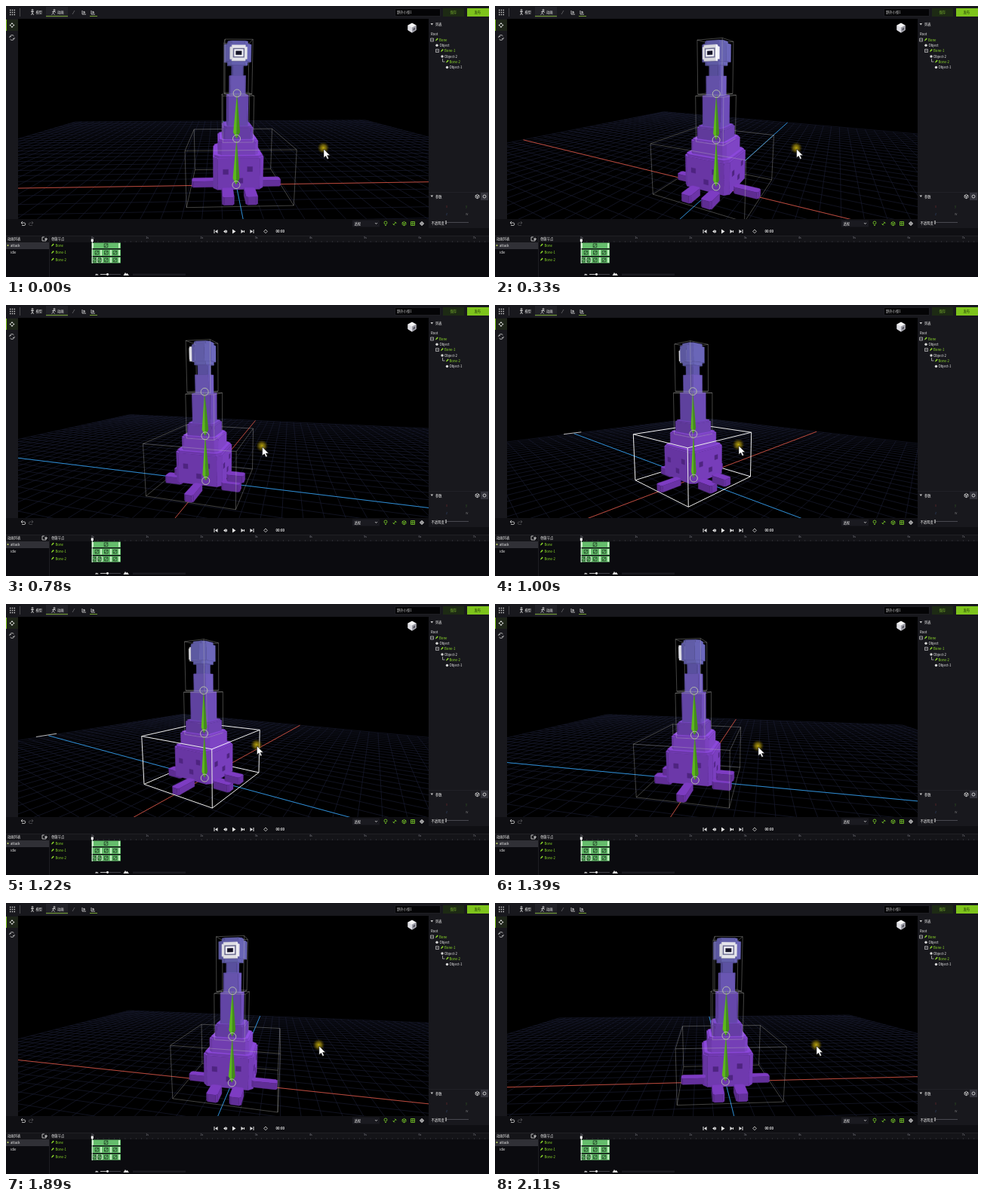
An HTML page with a canvas for the animation above (2160 ms loop, 640 by 360 pixels).

```html
<!DOCTYPE html>
<html lang="zh">
<head>
<meta charset="utf-8">
<title>Voxel animation editor</title>
<style>
  html, body { margin: 0; width: 100%; height: 100%; overflow: hidden; background: #000; }
  canvas { position: absolute; left: 16px; top: 17px; }
  svg { position: absolute; left: 0; top: 0; display: block; }
  text { font: 500 4.3px "Noto Sans CJK SC", "Noto Sans CJK", "Noto Sans", sans-serif; fill: #f0f0f0; }
  .bone { fill: #8fe02a; }
  .line { fill: none; stroke: #dedede; stroke-width: .8; }
  .green { stroke: #7bd02a; }
  .dim { opacity: .4; }
</style>
</head>
<body>
<canvas id="view" width="544" height="266"></canvas>
<svg width="640" height="360" viewBox="0 0 640 360">
  <defs>
    <radialGradient id="glow">
      <stop offset="0" stop-color="#d8c010" stop-opacity=".85"/>
      <stop offset=".5" stop-color="#a08a08" stop-opacity=".6"/>
      <stop offset="1" stop-color="#605000" stop-opacity="0"/>
    </radialGradient>
    <path id="key" d="M-2.3-2.3h4.6v4.6h-4.6zM-2.3 2.3L2.3-2.3" fill="none" stroke="#1c3a20" stroke-width=".8"/>
    <path id="pin" d="M0 3L.6 1.3 2.6-.9 3.7.2 1.6 2.3z" fill="#8fdc2c"/>
    <path id="cube" d="M0-2.6L2.4-1.3V1.4L0 2.7-2.4 1.4V-1.3zM-2.4-1.3L0 0 2.4-1.3M0 0V2.7"/>
  </defs>

  <!-- panels -->
  <g fill="#18181d">
    <path d="M0 0H640V17H0zM0 17H16V283H0zM560 17H640V295H560z"/>
    <path d="M0 283H560V295H0zM0 295H640V305H0z" fill="#0f0f13"/>
    <path d="M0 305H640V360H0z" fill="#0b0b0f"/>
    <path d="M0 305H640V314H0z" fill="#141418"/>
  </g>
  <path d="M560 247.500H640M57.500 305V360M0 305.500H640" stroke="#26262c" stroke-width=".7"/>

  <!-- top bar -->
  <path d="M5 5.500h7M5 8.500h7M5 11.500h7" stroke="#ccc" stroke-width="1.400" stroke-dasharray="1.400 1.400"/>
  <path class="line" d="M18.500 3V14" opacity=".3"/>
  <g class="line"><circle cx="35" cy="5.500" r="1"/><path d="M33 7.500h4M35 7v2l-1.500 3M35 9l1.500 3"/></g>
  <text x="39.500" y="10">模型</text>
  <path d="M53 1H82V16H53z" fill="#222228"/>
  <g class="line"><circle cx="64" cy="5.500" r="1"/><path d="M61 8l3-1 2 1.500M63.500 7l-1 2.500-2 2M62.500 9.500l2 2"/></g>
  <text x="68" y="10">动画</text>
  <path d="M53 13.500H82M111 13.500h10" stroke="#8ec43c" stroke-width=".8"/>
  <g class="line"><path d="M88 11l3-5" opacity=".4"/><path d="M101 6v5h5M103 9.500V7l2 1.500zM113 6v5h5M115 9.500V7l2 1.500z"/></g>
  <path d="M515.500 3.500H575.500V13.500H515.500z" fill="#040406" stroke="#292930" stroke-width=".6"/>
  <text x="518" y="10" style="fill:#c8c8c8">野外小怪1</text>
  <path d="M579 3H607V14H579z" fill="#1d2a14"/>
  <text x="588.500" y="10" style="fill:#7cb82e">保存</text>
  <path d="M611 3H640V14H611z" fill="#7ec41c"/>
  <text x="620.500" y="10" style="fill:#22380a">发布</text>

  <!-- tools -->
  <path d="M0 18H16V33H0z" fill="#1e2519"/>
  <path d="M0 18h1v15H0z" fill="#7ec41c"/>
  <path d="M8 22l1.600 2H6.400zM8 29l1.600-2H6.400zM4.500 25.500l2-1.600v3.200zM11.500 25.500l-2-1.600v3.200z" fill="#e8e8e8"/>
  <g class="line"><path d="M5.500 40a3 3 0 0 1 5 0M10.500 44a3 3 0 0 1-5 0M4.500 42l1-2 1.500 1M11.500 42l-1 2-1.500-1"/></g>
  <path d="M538 22.500L543.500 25.500V32L538 35.500 532.500 32V25.500z" fill="#f4f4f4"/>
  <path d="M538 28.500L543.500 25.500V32L538 35.500z" fill="#a0a0aa"/>
  <path d="M538 28.500V35.500L532.500 32V25.500z" fill="#dcdce2"/>
  <path d="M539.500 30l2.500-1.400v2.600l-2.500 1.500z" fill="#55555e"/>

  <!-- outline tree -->
  <path d="M562.500 23h3.600l-1.800 2.400zM562.500 251.500h3.600l-1.800 2.400z" fill="#ccc"/>
  <text x="569" y="26">列表</text>
  <text x="563" y="39">Root</text>
  <g class="line" stroke-width=".5" opacity=".8"><path d="M562.500 43h4v4h-4zM563.500 45h2M569.500 57.500h4v4h-4zM570.500 59.500h2M578.500 70v4h3"/></g>
  <use href="#pin" x="569" y="43.500"/><text class="bone" x="574" y="46.500">Bone</text>
  <use href="#pin" x="576" y="58"/><text class="bone" x="581" y="61.200">Bone-1</text>
  <use href="#pin" x="583" y="72.500"/><text class="bone" x="587.500" y="76">Bone-2</text>
  <g fill="#d8d8d8"><circle cx="571" cy="52.200" r="1.700"/><circle cx="578" cy="67" r="1.700"/><circle cx="584.500" cy="81.500" r="1.700"/></g>
  <text x="574.500" y="53.800">Object</text>
  <text x="581" y="68.500">Object-2</text>
  <text x="587.500" y="83">Object-1</text>

  <!-- parameters -->
  <text x="569" y="254.500">参数</text>
  <path d="M629 248H639V258H629z" fill="#34343c"/>
  <use href="#cube" class="line" x="624.500" y="253"/>
  <g class="line"><circle cx="634" cy="253" r="2"/></g>
  <g class="dim"><text x="583" y="268" style="fill:#d04040">x</text><text x="609" y="268" style="fill:#50b030">y</text><text x="583" y="278" style="fill:#5080d0">z</text><text x="609" y="278">w</text></g>
  <text x="563.500" y="289.500">不透明度</text>
  <path d="M583 287.500H613" stroke="#55555e" stroke-width=".8"/><path d="M583 285v5" stroke="#eee"/>

  <!-- viewport footer -->
  <g class="line"><path d="M20 288h4a1.700 1.700 0 0 1 0 3.500h-3M22 286l-2 2 2 2"/><path d="M36 288h-4a1.700 1.700 0 0 0 0 3.500h3M34 286l2 2-2 2" opacity=".3"/></g>
  <path d="M459 284.500H495V293.500H459z" fill="#1a1a20"/>
  <text x="461.500" y="290.500">透视</text><path class="line" d="M489 288l1.500 1.500 1.500-1.500"/>
  <g class="line green"><circle cx="503" cy="288" r="2"/><path d="M502 291.500h2M513 291l4-4M512.500 289l2.500 2.500M515 286.500l2.500 2.500M536.500 286.500h5v5h-5zM539 286.500v5M536.500 289h5"/></g>
  <use href="#cube" class="line green" x="527.500" y="289"/>
  <g class="line"><circle cx="551" cy="289" r="2"/><path d="M551 286v6M548 289h6"/></g>

  <!-- playback -->
  <g fill="#e4e4e4"><path d="M275.500 297h1v5h-1zM280.500 297v5l-3.500-2.500zM291.500 297v5l-3.500-2.500zM300 296.500l4.500 3-4.500 3zM311.500 297v5l3.500-2.500zM323.500 297v5l3.500-2.500zM327.500 297h1v5h-1z"/><path d="M292 298h1v3h-1zM315 298h1v3h-1z"/></g>
  <path class="line" d="M344 297l2.400 2.400-2.400 2.400-2.400-2.400z" stroke-width="1.100"/>
  <text x="357.500" y="301" style="font-weight:700">00:00</text>

  <!-- timeline -->
  <text x="2" y="311">动画列表</text>
  <g class="line"><path d="M51 307h-3v5h5v-3M51 309.500h4M53 307.500v4"/></g>
  <text x="60" y="311">骨骼节点</text>
  <path d="M0 314H57V323H0z" fill="#303036"/>
  <circle cx="2.500" cy="318" r="1" fill="#c2d860"/>
  <text x="6" y="319.700">attack</text>
  <text x="6" y="329">idle</text>
  <use href="#pin" x="60" y="316.500"/><text class="bone" x="65.500" y="319.700">Bone</text>
  <use href="#pin" x="60" y="326"/><text class="bone" x="65.500" y="329.300">Bone-1</text>
  <use href="#pin" x="60" y="335.500"/><text class="bone" x="65.500" y="338.800">Bone-2</text>
  <path d="M114.300 313H640" stroke="#3a3a42" stroke-width="2" stroke-dasharray=".6 6.625"/>
  <g id="ruler"></g>
  <path d="M113.500 314.500H152V322H113.500zM113.500 323.500H152V332H113.500zM113.500 333.500H152V341.500H113.500z" fill="#65bd6c"/>
  <path d="M114 315h2v6.500h-2zM149 315h2v6.500h-2zM125 324h2v7.500h-2zM138 324h2v7.500h-2zM149 324h2v7.500h-2zM120 334h2v7h-2zM126 334h2v7h-2zM138 334h2v7h-2zM149 334h2v7h-2z" fill="#c5f2c2"/>
  <use href="#key" x="132.500" y="318.200"/>
  <use href="#key" x="120.500" y="327.700"/><use href="#key" x="132.800" y="327.700"/><use href="#key" x="144.500" y="327.700"/>
  <use href="#key" x="117" y="337.500"/><use href="#key" x="124" y="337.500"/><use href="#key" x="132.800" y="337.500"/><use href="#key" x="144.500" y="337.500"/>
  <path d="M114.300 311V342" stroke="#fff" stroke-width=".8"/><path d="M112.800 309.500h3v3l-1.500 1.500-1.500-1.500z" fill="#fff"/>
  <path d="M118 357.500l1.500-2 1 1 .7-.7 1.300 1.700zM155.500 358l2.500-4 1.500 2 1-1.200 2.500 3.200z" fill="#e0e0e0"/>
  <path d="M125 356.500H152" stroke="#55555c" stroke-width=".8"/><path d="M125 356.500H134" stroke="#ddd" stroke-width=".8"/><circle cx="134.500" cy="356.500" r="1.400" fill="#fff"/>
  <path d="M168 355.500H238V358H168z" fill="#1a1a20"/>

  <g id="cursor">
    <circle cx="-.5" cy="-1.500" r="8" fill="url(#glow)"/>
    <path d="M0 0V11.500L2.700 9.200 4.700 13.400 6.600 12.500 4.700 8.500H8.300z" fill="#fff" stroke="#111" stroke-width=".5"/>
  </g>
</svg>
<script>
const LOOP = 2160, STEP = 1000 / 18, RAD = Math.PI / 180;
const ctx = document.getElementById('view').getContext('2d');
const cursor = document.getElementById('cursor');
ctx.translate(-16, -17);

const ruler = document.getElementById('ruler');
for (let s = 0; s < 8; s++) {
  ruler.innerHTML += `<text x="${113 + s * 72.25}" y="309" style="font-size:3.6px;fill:#8a8a92">${s}s</text>`;
}

// Keyed drag: time, camera yaw, camera pitch, pointer x, pointer y
const KEYS = [
  [0, -2, 9.4, 421, 190], [330, 27.5, 10.2, 400, 190], [610, 76, 11.2, 360, 190],
  [1000, 132.5, 7, 323, 187], [1390, 102, 9.4, 349, 190],
  [1890, 12.9, 10.6, 415, 190], [2110, -3.2, 10, 426, 190]
];
const keyAt = i => {
  const n = KEYS.length, lap = Math.floor(i / n), k = KEYS[i - lap * n];
  return [k[0] + lap * LOOP, ...k.slice(1)];
};
function sample(t) {
  let i = KEYS.length - 1;
  while (KEYS[i][0] > t) i--;
  const [p, a, b, q] = [-1, 0, 1, 2].map(d => keyAt(i + d));
  const span = b[0] - a[0], u = (t - a[0]) / span, u2 = u * u, u3 = u2 * u;
  return a.map((v, c) => {
    const m0 = (b[c] - p[c]) / (b[0] - p[0]) * span;
    const m1 = (q[c] - v) / (q[0] - a[0]) * span;
    return (2 * u3 - 3 * u2 + 1) * v + (u3 - 2 * u2 + u) * m0 + (3 * u2 - 2 * u3) * b[c] + (u3 - u2) * m1;
  }).slice(1);
}

// Camera orbiting a point beside the model; points are [x, height, z]
const FOCAL = 310, PIVOT = [-16, 84, -20], NEAR = 12;
const dot = (a, b) => a[0] * b[0] + a[1] * b[1] + a[2] * b[2];
let eye, right, up, ahead;
function aim(yaw, pitch) {
  const s = Math.sin(yaw), c = Math.cos(yaw), sp = Math.sin(pitch), cp = Math.cos(pitch);
  right = [c, 0, -s];
  up = [-s * sp, cp, -c * sp];
  ahead = [-s * cp, -sp, -c * cp];
  eye = PIVOT.map((v, i) => v - FOCAL * ahead[i]);
}
const toView = p => {
  const d = p.map((v, i) => v - eye[i]);
  return [dot(d, right), dot(d, up), dot(d, ahead)];
};
const flat = ([x, y, z]) => [288 + FOCAL * x / z, 150 - FOCAL * y / z];
const project = p => flat(toView(p));

function line(p, q) {
  let a = toView(p), b = toView(q);
  if (a[2] < NEAR && b[2] < NEAR) return;
  const cut = (from, to) => {
    const k = (NEAR - from[2]) / (to[2] - from[2]);
    return from.map((v, i) => v + (to[i] - v) * k);
  };
  if (a[2] < NEAR) a = cut(a, b);
  else if (b[2] < NEAR) b = cut(b, a);
  ctx.moveTo(...flat(a));
  ctx.lineTo(...flat(b));
}
function strokeLines(color, width, lines) {
  ctx.beginPath();
  for (const [p, q] of lines) line(p, q);
  ctx.strokeStyle = color;
  ctx.lineWidth = width;
  ctx.stroke();
}
function face(points, rgb, light = 1) {
  const color = `rgb(${rgb.map(v => Math.round(Math.min(255, v * light)))})`;
  ctx.beginPath();
  for (const p of points) ctx.lineTo(...project(p));
  ctx.closePath();
  ctx.fillStyle = ctx.strokeStyle = color;
  ctx.lineWidth = .4;
  ctx.fill();
  ctx.stroke();
}

// Upright block with cut corners
function block(rgb, hx, hz, y0, y1, cut = 0, cx = 0, cz = 0) {
  const ring = [[hx, hz - cut], [hx - cut, hz], [cut - hx, hz], [-hx, hz - cut],
    [-hx, cut - hz], [cut - hx, -hz], [hx - cut, -hz], [hx, cut - hz]].map(([x, z]) => [x + cx, z + cz]);
  const level = y => ring.map(([x, z]) => [x, y, z]);
  if (eye[1] > y1) face(level(y1), rgb, 1.2);
  if (eye[1] < y0) face(level(y0), rgb, .7);
  ring.forEach(([x, z], i) => {
    const [x2, z2] = ring[(i + 1) % 8], len = Math.hypot(x2 - x, z2 - z);
    if (!len) return;
    const nx = (z2 - z) / len, nz = (x - x2) / len;
    const out = nx * ((x + x2) / 2 - cx) + nz * ((z + z2) / 2 - cz) < 0 ? -1 : 1;
    if (((eye[0] - x) * nx + (eye[2] - z) * nz) * out <= 0) return;
    const light = .95 + .1 * out * (nx * right[0] + nz * right[2]);
    face([[x, y0, z], [x2, y0, z2], [x2, y1, z2], [x, y1, z]], rgb, light);
  });
}

const SIDES = [[1, 0], [-1, 0], [0, 1], [0, -1]];
const facing = ([x, z], r) => (eye[0] - x * r) * x + (eye[2] - z * r) * z > 0;

function leg([x, z]) {
  const rgb = [104, 50, 162];
  if (x) return block(rgb, 15.5, 5.5, 0, 8, 2, x * 41.5, 0);
  const near = right[0] > 0 ? [-13, 13] : [13, -13];
  for (const cx of near) block(rgb, 6.5, 11.5, 0, 9, 2, cx, z * 38.5);
}
function body() {
  const rgb = [116, 60, 182];
  block(rgb, 29.5, 29.5, 8, 46, 5);
  block(rgb, 28, 28, 46, 48.5, 5);
  for (const [x, z] of SIDES) {
    if (!facing([x, z], 29.5)) continue;
    for (const [s, y] of [[-15, 30], [13, 33], [2, 19]]) {
      const at = (d, h) => [x * 29.6 + z * (s + d), y + h, z * 29.6 - x * (s + d)];
      face([at(-3, -3), at(3, -3), at(3, 3), at(-3, 3)], [78, 36, 128]);
    }
  }
}
function eyePlate() {
  block([240, 240, 246], 9.5, 2, 158.5, 171.5, 0, 0, 13.5);
  block([240, 240, 246], 7.5, 2, 156.5, 173.5, 0, 0, 14);
  if (!facing([0, 1], 16.1)) return;
  const patch = (w, h, rgb) => face([[-w, 165 - h, 16.1], [w, 165 - h, 16.1], [w, 165 + h, 16.1], [-w, 165 + h, 16.1]], rgb);
  patch(6.3, 5, [104, 104, 142]);
  patch(5, 3.8, [244, 244, 250]);
  patch(3.2, 2, [22, 20, 40]);
}
function head() {
  const rgb = [104, 100, 180], front = facing([0, 1], 12);
  if (!front) eyePlate();
  block(rgb, 11.5, 10, 175.5, 179, 4);
  block(rgb, 15.5, 12, 156, 175.5, 6);
  block(rgb, 11.5, 10, 152, 156, 4);
  if (front) eyePlate();
}
function model() {
  for (const s of SIDES) if (!facing(s, 29.5)) leg(s);
  body();
  for (const s of SIDES) if (facing(s, 29.5)) leg(s);
  block([122, 66, 190], 23.5, 23.5, 48.5, 64, 4);
  block([122, 66, 190], 22, 22, 64, 66, 4);
  block([106, 64, 172], 18, 18, 66, 79, 3);
  block([106, 64, 172], 16.5, 16.5, 79, 81, 3);
  block([106, 74, 178], 12.4, 12.4, 81, 117, 1);
  head();
  block([96, 86, 170], 6.6, 6.6, 140, 152, 1);
  block([110, 90, 186], 9.2, 9.2, 117, 140, 1);
}

// Bounds as [x half, z min, z max, bottom, top]
const BOUNDS = [[58, -54, 53, 0, 63], [18, -18, 18, 62, 117], [15.5, -13, 17, 119, 179.5]];
function edges([hx, z0, z1, y0, y1]) {
  const c = [];
  for (let i = 0; i < 8; i++) c.push([i & 1 ? hx : -hx, i & 2 ? y1 : y0, i & 4 ? z1 : z0]);
  const out = [];
  for (let i = 0; i < 8; i++) for (const bit of [1, 2, 4]) if (!(i & bit)) out.push([c[i], c[i | bit]]);
  return out;
}
function drawBounds(front, pointerX) {
  BOUNDS.forEach((b, n) => {
    const all = edges(b), mid = [0, (b[3] + b[4]) / 2, (b[1] + b[2]) / 2], depth = toView(mid)[2];
    const hover = !n && Math.max(...all.flat().map(p => project(p)[0])) > pointerX;
    const part = all.filter(([p, q]) => (toView(p)[2] + toView(q)[2]) / 2 < depth === front);
    strokeLines(hover ? '#f0f0f0' : 'rgba(190,190,186,.5)', hover ? 1 : .7, part);
  });
}

const GRID = 484, CELLS = 24;
function floor() {
  const lines = [];
  for (let i = -CELLS; i <= CELLS; i++) {
    const d = i * GRID / CELLS;
    lines.push([[d, 0, -GRID], [d, 0, GRID]], [[-GRID, 0, d], [GRID, 0, d]]);
  }
  strokeLines('#191c30', .7, lines);
  strokeLines('#bc4838', 1, [[[-GRID, 0, 0], [GRID, 0, 0]]]);
  strokeLines('#2c8cd2', 1, [[[0, 0, -GRID], [0, 0, GRID]]]);
  strokeLines('#e8e8e8', .8, [[[-22, 0, GRID + 10], [22, 0, GRID + 10]]]);
}

const JOINTS = [0, 62, 119].map(y => [0, y, 0]);
function bones() {
  const pts = JOINTS.map(project);
  const half = 4.5 * Math.max(Math.abs(right[0]), Math.abs(right[2]));
  for (let i = 0; i < 2; i++) {
    const [x0, y0] = pts[i], [x1, y1] = pts[i + 1], wide = y0 + (y1 - y0) * .14;
    [[-half, '#5cb81c'], [half, '#438f16']].forEach(([w, color]) => {
      ctx.beginPath();
      ctx.moveTo(x0, y0);
      ctx.lineTo(x0 + w, wide);
      ctx.lineTo(x1, y1);
      ctx.fillStyle = color;
      ctx.fill();
    });
  }
  ctx.strokeStyle = '#b4bcaa';
  ctx.lineWidth = 1;
  for (const [x, y] of pts) {
    ctx.beginPath();
    ctx.arc(x, y, 5, 0, 7);
    ctx.stroke();
  }
}

function draw(now) {
  const t = now % LOOP, tick = Math.floor((t + 5) / STEP);
  const [yaw, pitch, x, y] = sample(tick * STEP);
  aim(yaw * RAD, pitch * RAD);
  ctx.fillStyle = '#000';
  ctx.fillRect(16, 17, 544, 266);
  floor();
  drawBounds(false, x);
  model();
  drawBounds(true, x);
  bones();
  cursor.setAttribute('transform', `translate(${x} ${y})`);
}
const start = performance.now();
function frame() {
  draw(performance.now() - start);
  requestAnimationFrame(frame);
}
frame();
</script>
</body>
</html>
```
